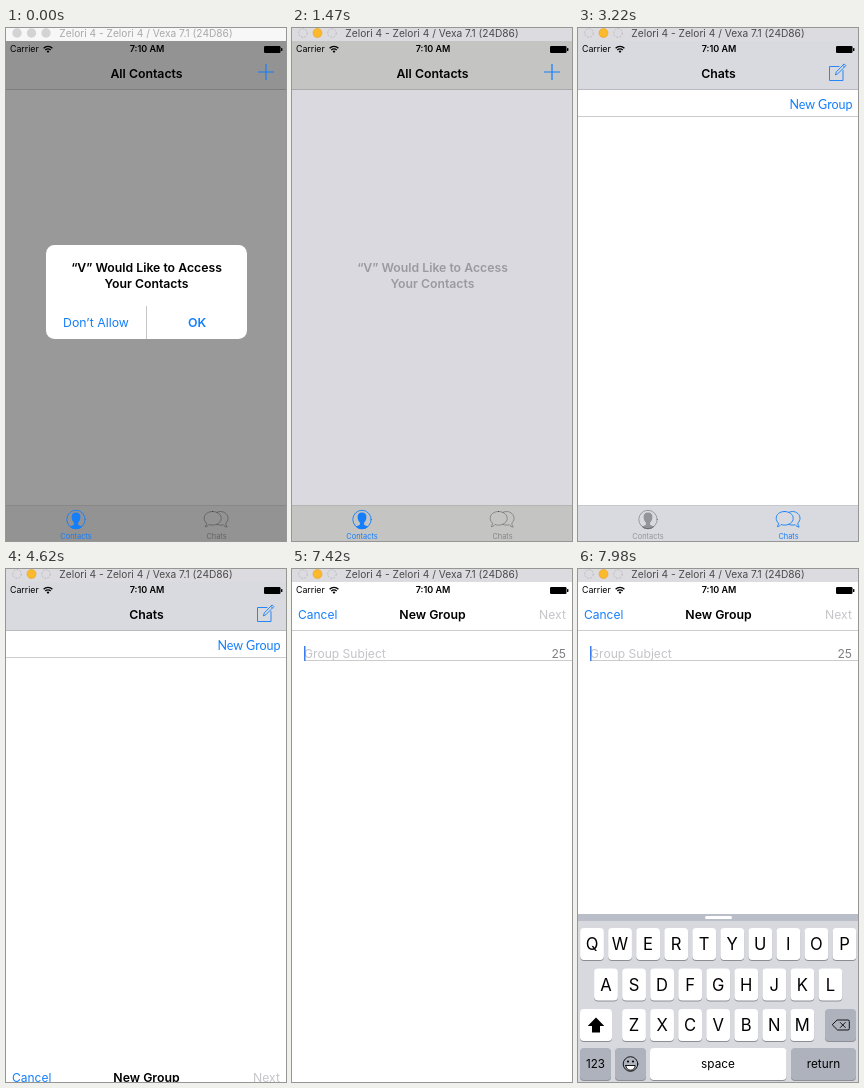
These frames come from a looping animation (280x513 px, 8 s). An HTML page:

```html
<!DOCTYPE html>
<html lang="en">
<head>
<meta charset="utf-8">
<title>New group flow</title>
<style>
  html, body { margin: 0; width: 100%; height: 100%; overflow: hidden; background: #fff; }
  svg { display: block; width: 280px; height: 513px; font-family: Inter, Roboto, sans-serif; }
  .line { stroke: #000; stroke-width: 1; }
  .icon { fill: none; stroke: currentColor; stroke-width: .9; stroke-linejoin: round; stroke-linecap: round; }
</style>
</head>
<body>
<svg id="stage" viewBox="0 0 280 513" xmlns="http://www.w3.org/2000/svg"></svg>
<script>
const LOOP = 8000, STEP = 70;
const BLUE = '#147efb', GREY = 'rgba(0,0,0,.32)';

// cy is the middle of the capital letters
const text = (x, cy, s, size, o = {}) =>
  `<text x="${x}" y="${(cy + size * .36).toFixed(2)}" font-size="${size}" fill="${o.fill || '#000'}"` +
  ` font-weight="${o.weight || 400}" text-anchor="${o.anchor || 'middle'}"` +
  (o.font ? ` font-family="${o.font}"` : '') + `>${s}</text>`;
const rect = (x, y, w, h, fill, r = 0, extra = '') =>
  `<rect x="${x}" y="${y}" width="${w}" height="${h}" rx="${r}" fill="${fill}" ${extra}/>`;
const hline = (x, y, alpha = .2) => `<path class="line" stroke-opacity="${alpha}" d="M${x} ${y}H280"/>`;
const group = (id, body) => `<g id="${id}">${body}</g>`;
const bold = { weight: 600 };

const lights = fill => [11, 25.5, 40].map((x, i) => fill(x, i)).join('');

const titleText = 'Zelori 4 - Zelori 4 / Vexa 7.1 (24D86)';
const idleBar = rect(0, 0, 280, 13, '#f7f7f7') +
  lights(x => `<circle cx="${x}" cy="5" r="4.7" fill="#d3d3d3"/>`) +
  text(140, 5.5, titleText, 10.2, { fill: '#a9a9a9' });
const activeBar = rect(0, 0, 280, 13, '#dcdce0') +
  lights((x, i) => i === 1
    ? `<circle cx="${x}" cy="5" r="4.5" fill="#fdb92c" stroke="#e3a12b" stroke-width=".6"/>`
    : `<circle cx="${x}" cy="5" r="4.3" fill="none" stroke="#b4b4b8" stroke-width=".8" stroke-dasharray="2 1.2"/>`) +
  text(140, 5.5, titleText, 10.2, { fill: '#4a4a4c' });

const statusBar = text(4, 21.2, 'Carrier', 8.8, { anchor: 'start' }) +
  `<g fill="none" stroke="#000" stroke-width="1.3"><path d="M37.6 20.2a6.2 6.2 0 0 1 8.8 0M39.3 22a3.8 3.8 0 0 1 5.4 0"/></g>
   <path d="M40.6 23.3a2 2 0 0 1 2.8 0L42 24.9z"/>` +
  text(141, 21.2, '7:10 AM', 9, bold) +
  rect(258, 18, 16.5, 7, '#000', 1.2) + rect(275, 20, 1.4, 3, '#000', .6);

const person = `<circle class="icon" cx="70" cy="491.5" r="9.2"/>
  <path fill="currentColor" d="M70 484.4c-3 0-4.6 2-4.4 4.8.1 2.6 1.2 4.3 2.3 5.4v2.2c-1 .9-2.9 1.2-4.2 1.9
  a9 9 0 0 0 12.6 0c-1.3-.7-3.2-1-4.2-1.9v-2.2c1.1-1.1 2.2-2.8 2.3-5.4.2-2.8-1.4-4.8-4.4-4.8z"/>`;
const bubbles = `<g class="icon"><path d="M206.5 483.5c5 0 8.7 3 8.7 6.8s-3.7 6.8-8.7 6.8c-1.3 0-2.5-.2-3.5-.6
  -1 1.3-2.2 2-3.7 2.2.8-1.1 1.2-2.3 1.2-3.6-1.5-1.3-2.3-2.9-2.3-4.8 0-3.8 3.3-6.8 8.3-6.8z"/>
  <path d="M211 484.3c1-.5 2.1-.8 3.3-.8 4.4 0 7.7 3 7.7 6.8 0 1.9-.8 3.5-2.2 4.8 0 1.5.5 2.8 1.4 4
  -1.7-.2-3-1-4-2.4-2.3.7-4.5.5-6.3-.3"/></g>`;

const base = rect(0, 13, 280, 500, '#fff', 0, 'id="page"') +
  rect(0, 13, 280, 49, '#fff', 0, 'class="bar"') + hline(0, 61.5, .14) +
  rect(0, 477, 280, 36, '#fff', 0, 'class="bar"') + hline(0, 477.5, .08) +
  group('tabContacts', person + text(70, 508.3, 'Contacts', 7.4, { fill: 'currentColor' })) +
  group('tabChats', bubbles + text(210.5, 508.3, 'Chats', 7.4, { fill: 'currentColor' }));

const contacts = text(140.5, 45.4, 'All Contacts', 12.3, bold) +
  `<path d="M260 36v16M252 44h16" stroke="${BLUE}" stroke-width="1.2"/>`;

const chats = text(140.5, 45.4, 'Chats', 12.3, bold) +
  `<g class="icon" color="${BLUE}"><path d="M261 38.5h-9.5v14h13.5v-10"/>
   <path d="M257.5 46.5l.8-2.6 7.8-8 1.7 1.7-7.8 8zM264.7 37.3l1.7 1.7"/></g>` +
  text(274.5, 76, 'New Group', 12.5, { fill: BLUE, anchor: 'end', font: 'Lato, sans-serif' }) +
  hline(0, 88.5);

const alertBox = rect(40, 217, 201, 94, '#fff', 8.5) +
  `<path id="press" fill="#dedee2" d="M141 278h100v24.5a8.5 8.5 0 0 1-8.5 8.5h-91.5z"/>
   <path class="line" stroke-opacity=".22" d="M140.5 278v33"/>` +
  text(90, 295, 'Don’t Allow', 12.3, { fill: BLUE }) +
  text(191, 295, 'OK', 12.4, { fill: BLUE, weight: 600 });
const alertText = text(140.5, 239.3, '“V” Would Like to Access', 12.25, bold) +
  text(140.5, 256, 'Your Contacts', 12.25, bold);

const sheet = rect(0, 13, 280, 500, '#fff') + hline(0, 61.5) +
  text(6, 45.4, 'Cancel', 12, { fill: BLUE, anchor: 'start' }) +
  text(140.5, 45.4, 'New Group', 12.3, bold) +
  text(274, 45.4, 'Next', 12.2, { fill: '#c6c6ca', anchor: 'end' }) +
  text(12, 84.3, 'Group Subject', 12.1, { fill: '#c4c4c9', anchor: 'start' }) +
  text(274, 84.3, '25', 12.1, { fill: '#808084', anchor: 'end' }) + hline(12, 91.5);

const key = (x, y, w, fill = '#fff') => rect(x, y + 1, w, 32, '#8b8e94', 4) + rect(x, y, w, 32, fill, 4);
const letters = (row, x0, y) => [...row].map((c, i) => {
  const cx = x0 + i * 28.05;
  return key(cx - 11.9, y, 23.8) + text(cx, y + 16.3, c, 16.6);
}).join('');
const DARK = '#adb2bc';
const keyboard = rect(0, 345, 280, 168, '#d7d9df') + rect(0, 345, 280, 7, '#babec8') +
  rect(127, 347, 27, 3, '#fff', 1.5) +
  letters('QWERTYUIOP', 14, 359) + letters('ASDFGHJKL', 28, 399.5) + letters('ZXCVBNM', 56, 440) +
  key(2, 440, 32) + `<path d="M18 448.5l8.3 8.5h-4.3v6.5h-8v-6.5h-4.3z"/>` +
  key(247, 440, 31, DARK) +
  `<g class="icon" color="#000"><path d="M259.5 451h10.5q1.3 0 1.3 1.3v7.4q0 1.3-1.3 1.3h-10.5l-5-5z"/>
   <path d="M262.3 453.5l5 5m0-5l-5 5"/></g>` +
  key(2, 479, 31, DARK) + text(17.5, 495, '123', 11.6) +
  key(37, 479, 31, DARK) +
  `<g class="icon" color="#000"><circle cx="52.5" cy="495" r="7.3"/><path d="M47.8 496.5h9.4a4.7 4.7 0 0 1-9.4 0z" fill="#fff"/></g>
   <circle cx="50" cy="492.5" r="1.1"/><circle cx="55" cy="492.5" r="1.1"/>` +
  key(72, 479, 136.5) + text(140, 495, 'space', 11.8) +
  key(213, 479, 65, DARK) + text(245.5, 495, 'return', 11.8);

const stage = document.getElementById('stage');
stage.innerHTML = base + group('contacts', contacts) + group('chats', chats) +
  group('alertBox', alertBox) + group('alertText', alertText) +
  group('sheet', sheet) + rect(12, 77, 1.5, 15, '#3b7df2', 0, 'id="caret"') +
  group('keyboard', keyboard) + statusBar + group('idle', idleBar) + group('active', activeBar);

const el = id => document.getElementById(id);
const bars = document.querySelectorAll('.bar');
const show = (id, on) => { el(id).style.display = on ? '' : 'none'; };
const shift = (id, y) => el(id).setAttribute('transform', `translate(0 ${y.toFixed(2)})`);
const clamp = v => Math.max(0, Math.min(1, v));
// fades from a colour to grey; blue may lag or lead
const shade = (from, grey, k, blueK) =>
  `rgb(${from.map((v, i) => Math.round(v + (grey - v) * (i === 2 ? blueK : k)))})`;

// cubic-bezier(.38, .7, .125, 1), solved by bisection
function glide(u) {
  u = clamp(u);
  if (u === 0 || u === 1) return u;
  const curve = (s, a, b) => 3 * a * s * (1 - s) ** 2 + 3 * b * s * s * (1 - s) + s ** 3;
  let lo = 0, hi = 1;
  for (let i = 0; i < 24; i++) {
    const m = (lo + hi) / 2;
    if (curve(m, .38, .125) < u) lo = m; else hi = m;
  }
  return curve(lo, .7, 1);
}

function draw(now) {
  const t = Math.floor((now % LOOP) / STEP) * STEP;
  const dim = t < 1400 ? 1 : (1 - clamp((t - 1370) / 380)) ** 3.26;
  const inChats = t >= 3220;

  show('idle', t < 1190);
  show('active', t >= 1190);
  el('page').setAttribute('fill', shade([255, 255, 255], 153, dim, dim ** 1.17));
  const barFill = shade([217, 218, 223], 147, dim ** 1.2, dim);
  bars.forEach(b => b.setAttribute('fill', barFill));

  show('contacts', !inChats);
  show('chats', inChats);
  el('tabContacts').style.color = inChats ? GREY : BLUE;
  el('tabChats').style.color = inChats ? BLUE : GREY;

  show('press', t >= 1190);
  el('alertBox').style.opacity = clamp((dim - .37) / .63);
  el('alertText').style.opacity = dim ** 1.25;

  show('sheet', t >= 4620);
  shift('sheet', 500 * (1 - glide((t - 4598) / 570)));
  show('caret', t >= 7420);
  show('keyboard', t > 7420);
  shift('keyboard', 168 * (1 - glide((t - 7420) / 555)));
}

function tick(now) {
  draw(now);
  requestAnimationFrame(tick);
}
draw(0);
requestAnimationFrame(tick);
</script>
</body>
</html>
```
